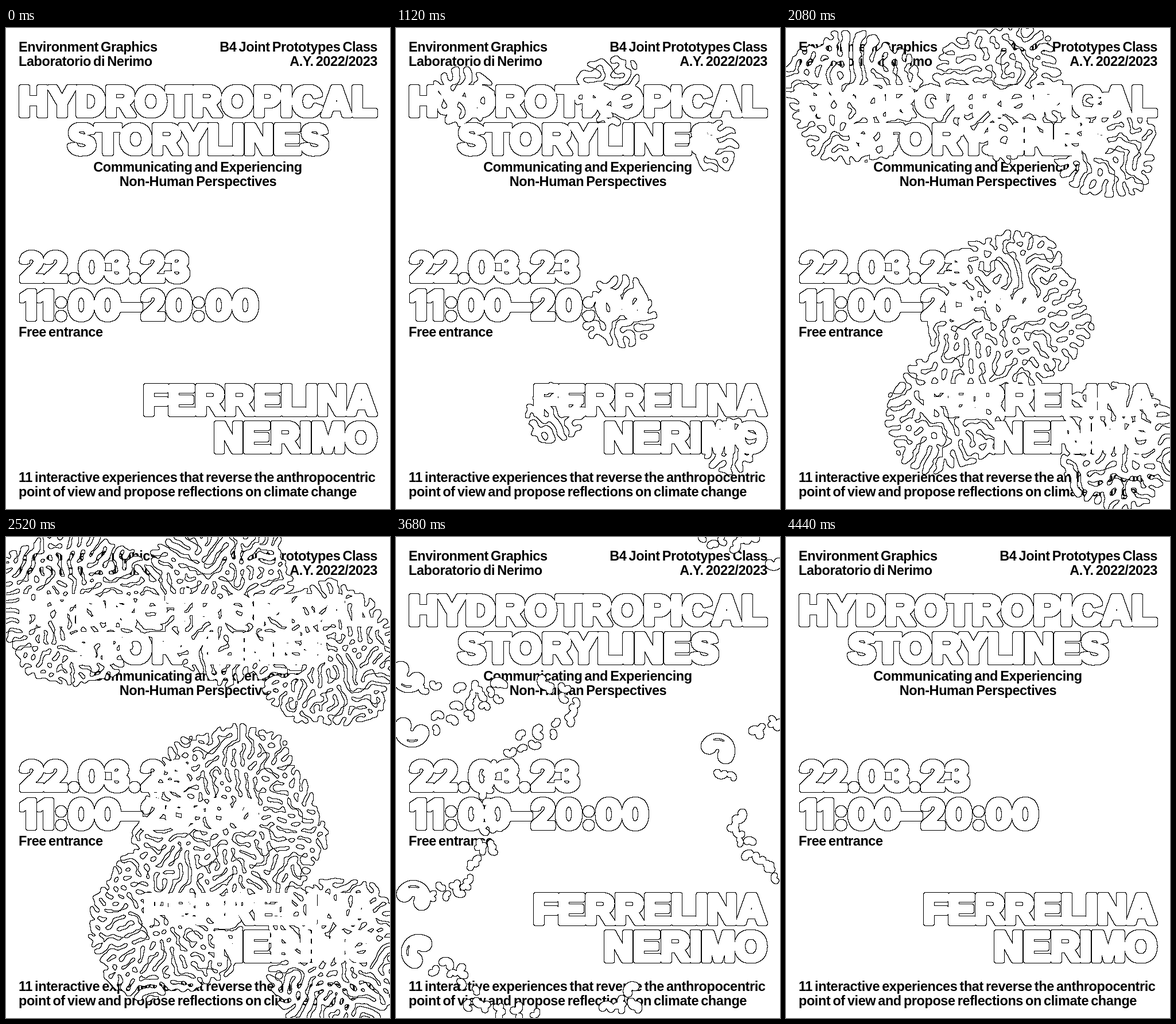
Animation of 669 by 837 pixels, one loop 4480 ms. Source, as an HTML page with a canvas:

```html
<!DOCTYPE html>
<html lang="en">
<head>
<meta charset="utf-8">
<title>Hydrotropical Storylines</title>
<style>
  html, body { margin: 0; width: 100%; height: 100%; overflow: hidden; background: #fff; }
  svg, canvas { position: absolute; left: 0; top: 0; width: 669px; height: 837px; display: block; }
  text {
    font: 700 23.5px "Liberation Sans", Arial, sans-serif;
    letter-spacing: -0.42px; word-spacing: -2px; fill: #000;
  }
  .mid { text-anchor: middle; }
  .end { text-anchor: end; }
</style>
</head>
<body>
<svg viewBox="0 0 669 837">
  <text x="22" y="41.4">Environment Graphics</text>
  <text x="22" y="66">Laboratorio di Nerimo</text>
  <text class="end" x="647" y="41.4">B4 Joint Prototypes Class</text>
  <text class="end" x="647" y="66">A.Y. 2022/2023</text>
  <text class="mid" x="334" y="250.3">Communicating and Experiencing</text>
  <text class="mid" x="334.5" y="275">Non-Human Perspectives</text>
  <text x="22" y="537">Free entrance</text>
  <text x="22" y="790.4">11 interactive experiences that reverse the anthropocentric</text>
  <text x="22" y="815">point of view and propose reflections on climate change</text>
</svg>
<canvas id="stage" width="669" height="837"></canvas>
<script>
const W = 669, H = 837, LOOP = 4480, STEP = 40;
// The growth is computed on a grid of 2 px cells
const GW = 336, GH = 420, CELLS = GW * GH;
const WORDS = '700 70px "Liberation Sans", Arial, sans-serif';
const DIGITS = '700 66px Inter, "Liberation Sans", sans-serif';

// Colony: x, y, then its radius at the last four KEYS
const KEYS = [200, 600, 1560, 2080, 2960, 3600];
const SEEDS = [
  [115, 118, 78, 118, 157, 180],
  [370, 108, 92, 117, 160, 185],
  [555, 207, 64, 92, 160, 170],
  [388, 494, 97, 138, 190, 222],
  [275, 672, 74, 104, 165, 205],
  [582, 726, 72, 112, 160, 185]
];

// Paths of the bead chains; each starts with a large bean
const CHAINS = [
  [22, 240, 66, 264],
  [28, 335, 72, 324, 140, 296, 190, 262, 105, 272],
  [262, 250, 302, 272, 308, 305, 270, 338, 232, 350, 160, 412, 150, 480, 180, 530, 140, 545, 155, 575],
  [30, 628, 72, 612, 115, 625, 110, 596, 135, 575],
  [40, 722, 82, 752, 118, 765, 130, 805, 200, 826, 245, 832],
  [560, 372, 580, 425],
  [625, 345, 640, 330, 669, 320],
  [595, 483, 590, 515, 612, 548, 669, 588],
  [620, 8, 575, 10, 535, 10],
  [658, 42, 669, 30],
  [412, 790, 425, 806, 385, 818, 362, 834]
];
const SMALL_START = [2, 6, 7, 8, 9, 10];

const clamp = (v, a = 0, b = 1) => Math.min(b, Math.max(a, v));
const ramp = (t, a, b) => clamp((t - a) / (b - a));

function random(seed) {
  return () => {
    seed = (seed + 0x6D2B79F5) | 0;
    let n = Math.imul(seed ^ (seed >>> 15), 1 | seed);
    n = (n + Math.imul(n ^ (n >>> 7), 61 | n)) ^ n;
    return ((n ^ (n >>> 14)) >>> 0) / 4294967296;
  };
}

function layer() {
  const c = document.createElement('canvas');
  c.width = W;
  c.height = H;
  return c.getContext('2d', { willReadFrequently: true });
}

function readMask(g) {
  const data = g.getImageData(0, 0, W, H).data;
  const mask = new Uint8Array(W * H);
  for (let p = 0; p < mask.length; p++) mask[p] = data[p * 4 + 3] > 127 ? 1 : 0;
  return mask;
}

function nearest(x, y) {
  let best = SEEDS[0], low = Infinity;
  for (const s of SEEDS) {
    const d = Math.hypot(x - s[0], y - s[1]) - s[4];
    if (d < low) { low = d; best = s; }
  }
  return best;
}

// Swollen headline letters; align 0 = left, 0.5 = centre, 1 = right
function titleMask() {
  const g = layer();
  g.lineJoin = 'round';
  g.lineWidth = 8.2;
  const put = (str, x, y, align, font, gap) => {
    g.font = font;
    g.letterSpacing = gap + 'px';
    const m = g.measureText(str);
    const left = -m.actualBoundingBoxLeft, right = m.actualBoundingBoxRight;
    const at = x - left - (right - left) * align;
    g.strokeText(str, at, y);
    g.fillText(str, at, y);
  };
  put('HYDROTROPICAL', 335, 152, 0.5, WORDS, 1);
  put('STORYLINES', 334.5, 217.5, 0.5, WORDS, 1);
  put('22.03.23', 27, 440, 0, DIGITS, 0);
  put('11:00–20:00', 27, 505.5, 0, DIGITS, 1.6);
  put('FERRELINA', 643, 671.5, 1, WORDS, 0.6);
  put('NERIMO', 643, 737, 1, WORDS, 0.6);
  return readMask(g);
}

function blur(src, sigma) {
  const n = Math.ceil(sigma * 2.6), taps = [];
  let sum = 0;
  for (let i = -n; i <= n; i++) sum += taps[i + n] = Math.exp(-i * i / (2 * sigma * sigma));
  const kernel = Float32Array.from(taps, v => v / sum);
  const mid = new Float32Array(CELLS), out = new Float32Array(CELLS);
  for (let y = 0, p = 0; y < GH; y++) {
    for (let x = 0; x < GW; x++, p++) {
      let v = 0;
      for (let i = -n; i <= n; i++) v += kernel[i + n] * src[p - x + clamp(x + i, 0, GW - 1)];
      mid[p] = v;
    }
  }
  for (let y = 0; y < GH; y++) {
    for (let i = -n; i <= n; i++) {
      const row = clamp(y + i, 0, GH - 1) * GW, k = kernel[i + n];
      for (let x = 0; x < GW; x++) out[y * GW + x] += k * mid[row + x];
    }
  }
  return out;
}

// Winding stripes that tend to run outwards from the colonies
function stripes(len, seed) {
  const rnd = random(seed), out = new Float32Array(CELLS);
  const R = 1.8 * len, gap = len * 0.55;
  for (let gy = 0; gy < GH + gap; gy += gap) {
    for (let gx = 0; gx < GW + gap; gx += gap) {
      const cx = gx + (rnd() - 0.5) * gap, cy = gy + (rnd() - 0.5) * gap;
      const X = cx * 2, Y = cy * 2, s = nearest(X, Y);
      const bend = 0.8 * Math.sin(X * 0.06 + seed + 1.5 * Math.sin(Y * 0.05));
      const a = Math.atan2(Y - s[1], X - s[0]) + Math.PI / 2 + bend + (rnd() - 0.5) * 1.9;
      const kx = Math.cos(a) * 2 * Math.PI / len, ky = Math.sin(a) * 2 * Math.PI / len;
      const phase = rnd() * 2 * Math.PI;
      const x0 = Math.max(0, Math.ceil(cx - R)), x1 = Math.min(GW - 1, cx + R);
      const y0 = Math.max(0, Math.ceil(cy - R)), y1 = Math.min(GH - 1, cy + R);
      for (let y = y0; y <= y1; y++) {
        for (let x = x0; x <= x1; x++) {
          const dx = x - cx, dy = y - cy;
          const q = 1 - (dx * dx + dy * dy) / (R * R);
          if (q > 0) out[y * GW + x] += q * q * Math.cos(kx * dx + ky * dy + phase);
        }
      }
    }
  }
  let sum = 0;
  for (const v of out) sum += v * v;
  const norm = 1 / Math.sqrt(sum / CELLS);
  return out.map(v => v * norm);
}

// Activator and inhibitor turn the stripes into even, round-tipped arms
function labyrinth(wave, seed) {
  const len = wave / 2, sigma = len / 5.72;
  let u = stripes(len, seed);
  for (let i = 0; i < 5; i++) {
    const near = blur(u, sigma), far = blur(u, sigma * 1.6);
    u = near.map((v, p) => Math.tanh(6 * (v - far[p]) + 0.25));
  }
  return u;
}

// Distance from a colony's centre with an uneven rim
function distances(s, i) {
  const out = new Float32Array(CELLS);
  for (let y = 0, p = 0; y < GH; y++) {
    for (let x = 0; x < GW; x++, p++) {
      const dx = x * 2 - s[0], dy = y * 2 - s[1], a = Math.atan2(dy, dx);
      const rim = 1 + 0.05 * Math.sin(3 * a + i) + 0.04 * Math.sin(5 * a + i * 3.4) + 0.025 * Math.sin(11 * a + i);
      out[p] = Math.hypot(dx, dy) * rim;
    }
  }
  return out;
}

function makeBeads() {
  const rnd = random(23), beads = [];
  const add = (x, y, r) => {
    const s = nearest(x, y), d = Math.hypot(x - s[0], y - s[1]) || 1;
    beads.push({
      x, y, r, a: rnd() * 6.28, sweep: r > 18 ? 3.2 : 1.2 + rnd() * 1.5,
      ux: (x - s[0]) / d, uy: (y - s[1]) / d,
      born: 3330 + rnd() * 150, die: 3900 + rnd() * 460
    });
  };
  CHAINS.forEach((c, n) => {
    const small = SMALL_START.includes(n);
    add(c[0], c[1], small ? 14 : 27);
    let next = small ? 18 : 36, side = 1;
    for (let i = 0; i + 3 < c.length; i += 2) {
      const dx = c[i + 2] - c[i], dy = c[i + 3] - c[i + 1], len = Math.hypot(dx, dy);
      for (; next < len; next += 13 + rnd() * 5) {
        const off = side * (4 + rnd() * 7) / len;
        side = -side;
        add(c[i] + dx * next / len - dy * off, c[i + 1] + dy * next / len + dx * off, 8.5 + rnd() * 4);
      }
      next -= len;
    }
  });
  return beads;
}

const title = titleMask();
const coarse = labyrinth(19, 5), fine = labyrinth(15, 11);
const dist = SEEDS.map(distances);
const beads = makeBeads();
const beadLayer = layer();
const stage = document.getElementById('stage').getContext('2d');
const image = stage.createImageData(W, H);
const pixels = new Uint32Array(image.data.buffer);
const inside = new Uint8Array(W * H);
const field = new Float32Array(CELLS);

function radius(s, t) {
  const r = [-10, 23, ...s.slice(2)];
  let i = 0;
  while (i < KEYS.length - 2 && t > KEYS[i + 1]) i++;
  return r[i] + (r[i + 1] - r[i]) * ramp(t, KEYS[i], KEYS[i + 1]);
}

function grow(t) {
  const [d0, d1, d2, d3, d4, d5] = dist;
  const [r0, r1, r2, r3, r4, r5] = SEEDS.map(s => radius(s, t));
  const q = ramp(t, 1700, 2800), lace = ramp(t, 650, 1050);
  const band = t > 3050 ? 210 - 235 * ramp(t, 3050, 3620) : 999;
  for (let p = 0; p < CELLS; p++) {
    const e = Math.max(r0 - d0[p], r1 - d1[p], r2 - d2[p], r3 - d3[p], r4 - d4[p], r5 - d5[p]);
    if (e < -6) { field[p] = -1; continue; }
    const tex = coarse[p] * (1 - q) + fine[p] * q;
    let f = tex * 1.3 + 0.1 - 2.5 * Math.max(0, 1 - (e + 4) / 9);
    if (lace < 1) {
      const slit = 3 * Math.max(0, 1 - Math.abs(e - 9) / 5) * clamp(-tex * 1.5, 0, 1.2);
      f = f * lace + (clamp(e / 4, -3, 3) - slit) * (1 - lace);
    }
    if (band < 999) f = Math.min(f, (band - e) / 8 + tex * 0.5);
    field[p] = clamp(f, -1, 1);
  }
  const soft = blur(field, 1.1);
  for (let y = 0; y < H; y++) {
    const row = Math.min(y >> 1, GH - 2) * GW, fy = (y & 1) / 2;
    for (let x = 0; x < W; x++) {
      const i = row + (x >> 1), fx = (x & 1) / 2;
      const top = soft[i] * (1 - fx) + soft[i + 1] * fx;
      const low = soft[i + GW] * (1 - fx) + soft[i + GW + 1] * fx;
      if (top * (1 - fy) + low * fy > 0) inside[y * W + x] = 1;
    }
  }
}

function drawBeads(t) {
  const g = beadLayer;
  g.clearRect(0, 0, W, H);
  g.lineCap = 'round';
  for (const b of beads) {
    const k = Math.min(ramp(t, b.born, b.born + 180), ramp(t, b.die, b.die - 160));
    if (k <= 0) continue;
    const move = (t - 3680) * 0.04, r = b.r * k;
    const x = b.x + b.ux * move, y = b.y + b.uy * move;
    g.lineWidth = r;
    g.beginPath();
    g.arc(x, y, r * 0.62, b.a, b.a + b.sweep);
    g.stroke();
    if (r > 18) {
      g.globalCompositeOperation = 'destination-out';
      g.lineWidth = 3.5;
      g.beginPath();
      g.arc(x, y, r * 0.75, b.a + 0.8, b.a + 1.6);
      g.stroke();
      g.globalCompositeOperation = 'source-over';
    }
  }
  const mask = readMask(g);
  for (let p = 0; p < mask.length; p++) if (mask[p]) inside[p] = 1;
}

// White inside, a black line around it, clear elsewhere
function paint() {
  const filled = (x, y) => x >= 0 && x < W && y >= 0 && y < H && inside[y * W + x];
  for (let y = 0, p = 0; y < H; y++) {
    for (let x = 0; x < W; x++, p++) {
      if (inside[p]) { pixels[p] = 0xffffffff; continue; }
      const edge = filled(x - 1, y) || filled(x + 1, y) || filled(x, y - 1) || filled(x, y + 1) ||
        filled(x - 1, y - 1) || filled(x + 1, y - 1) || filled(x - 1, y + 1) || filled(x + 1, y + 1);
      pixels[p] = edge ? 0xff000000 : 0;
    }
  }
  stage.putImageData(image, 0, 0);
}

function draw(t) {
  inside.set(title);
  if (t > 200 && t < 3640) grow(t);
  if (t > 3330 && t < 4400) drawBeads(t);
  paint();
}

let shown = 0;
draw(0);
const start = performance.now();
function tick() {
  const t = Math.floor(((performance.now() - start) % LOOP) / STEP) * STEP;
  if (t !== shown) {
    shown = t;
    draw(t);
  }
  requestAnimationFrame(tick);
}
requestAnimationFrame(tick);
</script>
</body>
</html>
```
